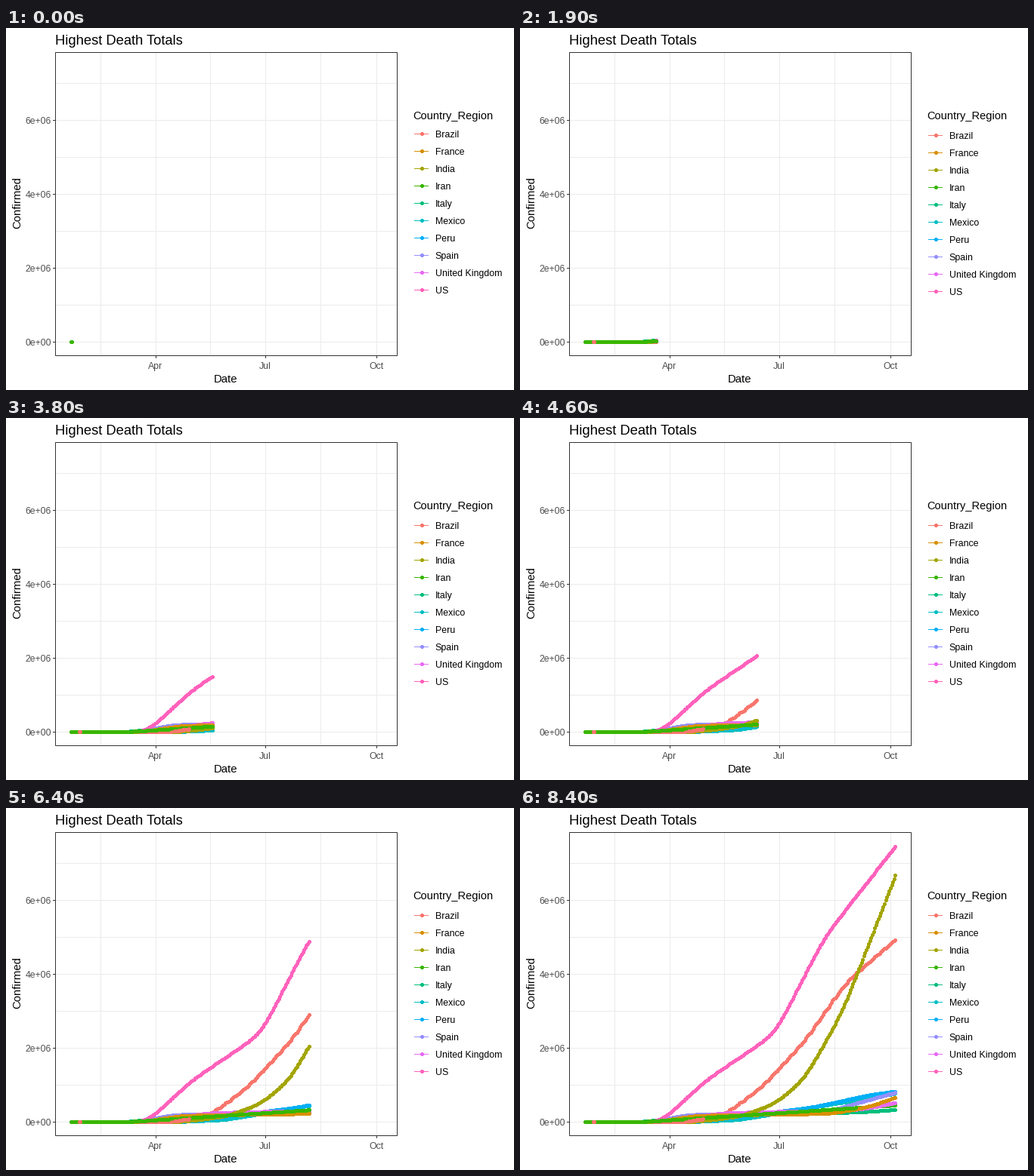
Recreate the animation shown at these times as a matplotlib script. Size 672 by 480 pixels, loop 10 s.

```python
import numpy as np
import matplotlib.pyplot as plt
from matplotlib.animation import FuncAnimation

W, H, DPI = 672, 480, 96
FRAMES, REVEAL_FRAMES, INTERVAL = 100, 84, 100
LAST_DAY = 257  # days since 22 January
LEFT, TOP, RIGHT, BOTTOM = 65, 32, 517, 434
DARK, GREY, GRID = "#333333", "#4D4D4D", "#EBEBEB"
PX = 72 / DPI  # one pixel in points

# Each outbreak is a run of bends: (day, change in thousands of cases per day).
BENDS = {
    "Brazil": [(85, 6), (115, 18), (146, 11), (182, 12), (216, -19)],
    "France": [(59, 5.3), (91, -4.8), (203, 5), (234, 6)],
    "India": [(91, 4), (129, 8), (158, 16), (182, 30), (213, 26)],
    "Iran": [(47, 2.15)],
    "Italy": [(49, 4.6), (94, -4.2), (226, 1.8)],
    "Mexico": [(86, 1.3), (127, 4.2)],
    "Peru": [(94, 4.2), (190, 3), (237, -3)],
    "Spain": [(56, 7), (84, -6.5), (197, 8.5)],
    "United Kingdom": [(65, 5), (113, -4.2), (228, 5.5)],
    "US": [(63.1, 30.5), (100, -8.5), (157.2, 42), (198.2, -22.4)],
}
COLORS = ("#F8766D", "#D89000", "#A3A500", "#39B600", "#00BF7D",
          "#00BFC4", "#00B0F6", "#9590FF", "#E76BF3", "#FF62BC")


def cumulative_cases(bends, days, softness=4):
    """Sum of soft ramps: growth changes smoothly around each bend."""
    return sum(rate * softness * np.logaddexp(0, (days - start) / softness)
               for start, rate in bends)


def x_px(day):
    return np.floor(86.04 + 1.5989 * day)


def y_px(thousands):
    return np.floor(416.6 - 0.049 * thousands)


def build_points():
    """All dots in stacking order: rows sorted by their number as text."""
    days = np.arange(LAST_DAY + 1)
    ys = []
    for country, bends in BENDS.items():
        cases = cumulative_cases(bends, days)
        if country == "Brazil":  # weekend reporting dips
            cases = cases - 0.45 * np.gradient(cases) * np.cos(2 * np.pi * (days - 5.5) / 7)
        ys.append(y_px(cases))
    all_days = np.tile(days, len(BENDS))
    xy = np.column_stack((x_px(all_days), np.concatenate(ys))) + 0.5
    order = np.argsort(np.arange(1, len(xy) + 1).astype(str))
    return xy[order], all_days[order], np.repeat(COLORS, len(days))[order]


plt.rcParams["font.family"] = "Liberation Sans"
fig = plt.figure(figsize=(W / DPI, H / DPI), dpi=DPI, facecolor="white")
ax = fig.add_axes((0, 0, 1, 1))
ax.set_xlim(0, W)
ax.set_ylim(H, 0)
ax.axis("off")


def h_line(x0, x1, y, color, z=1):
    return ax.plot((x0, x1), (y + 0.5, y + 0.5), color=color, lw=PX, snap=False,
                   solid_capstyle="butt", zorder=z)[0]


def v_line(x, y0, y1, color, z=1):
    return ax.plot((x + 0.5, x + 0.5), (y0, y1), color=color, lw=PX, snap=False,
                   solid_capstyle="butt", zorder=z)[0]


def label(x, y, text, size, color="black", **kw):
    return ax.text(x, y, text, fontsize=size * PX, color=color, va="baseline", **kw)


def dots(xy, colors, z):
    # Without smoothing every touched pixel fills, so 4 px draws a round 5 px dot.
    return ax.scatter(xy[:, 0], xy[:, 1], s=(4 * PX) ** 2, c=colors, linewidths=0,
                      antialiased=False, snap=False, zorder=z)


for x in (125, 270, 416):
    v_line(x, TOP, BOTTOM, GRID)
for x, month in ((198, "Apr"), (343, "Jul"), (490, "Oct")):
    v_line(x, TOP, BOTTOM, GRID)
    v_line(x, BOTTOM, BOTTOM + 4, DARK)
    label(x, 452, month, 12.2, GREY, ha="center")
for millions in range(8):
    y = y_px(1000 * millions)
    h_line(LEFT, RIGHT, y, GRID)
    if millions % 2 == 0:
        h_line(LEFT - 3, LEFT, y, DARK)
        label(59.5, y + 5, f"{millions}e+06" if millions else "0e+00",
              12.2, GREY, ha="right")
ax.add_patch(plt.Rectangle((LEFT + 0.5, TOP + 0.5), RIGHT - LEFT, BOTTOM - TOP,
                           fill=False, ec=DARK, lw=PX, snap=False, zorder=5))

label(64.6, 22, "Highest Death Totals", 18.4)
label(291, 470, "Date", 14.9, ha="center")
label(19.6, 232, "Confirmed", 14.9, ha="center", rotation=90, rotation_mode="anchor")
label(538, 121, "Country_Region", 14.6)

key_rows = np.arange(len(BENDS)) * 23.04
key_x = np.full(len(BENDS), 550.5)
key_lines = [h_line(540, 559, 0, color, 3) for color in COLORS]
key_names = [label(567.8, 0, name, 12.4) for name in BENDS]
key_dots = dots(np.column_stack((key_x, key_rows)), COLORS, 4)

points, point_days, point_colors = build_points()
trail = dots(points, point_colors, 3)
point_rgba = trail.get_facecolors().copy()


def place_legend(first_y):
    ys = np.floor(first_y + key_rows) + 0.5
    for y, line, name in zip(ys, key_lines, key_names):
        line.set_ydata((y, y))
        name.set_y(y + 4.5)
    key_dots.set_offsets(np.column_stack((key_x, ys)))


def update(frame):
    place_legend(140.6 if frame == 0 else 142.1)
    progress = min(frame / REVEAL_FRAMES, 1)
    shown = point_days <= round(progress * LAST_DAY) + 1
    trail.set_offsets(points[shown])
    trail.set_facecolors(point_rgba[shown])
    return [trail, key_dots, *key_lines, *key_names]


anim = FuncAnimation(fig, update, frames=FRAMES, interval=INTERVAL,
                     repeat=True, repeat_delay=0, blit=False)
plt.show()
```
